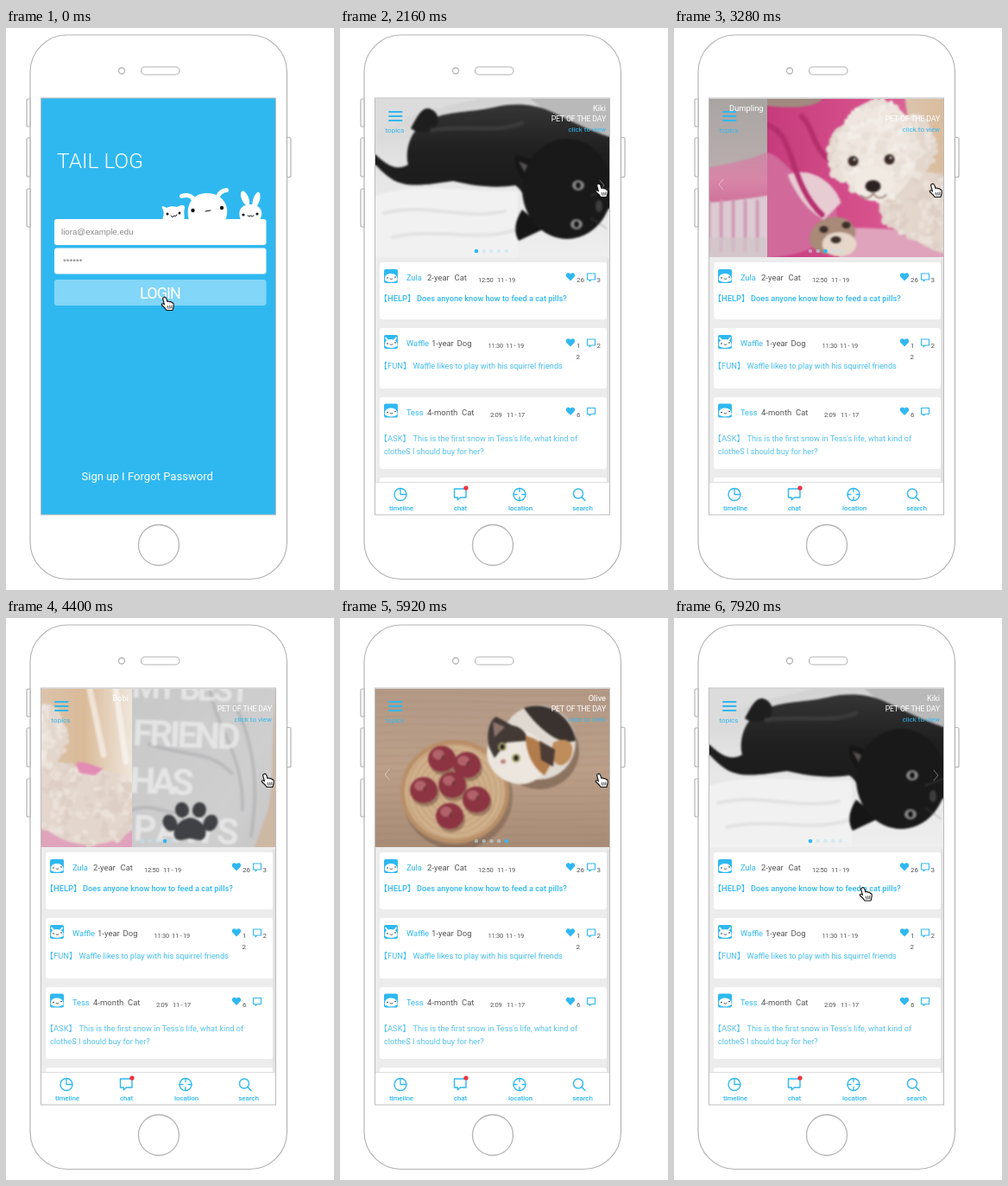
Animation, 380 px wide and 650 px high, one loop 8000 ms. Source, as an HTML page with a canvas:

```html
<!DOCTYPE html>
<html lang="en">
<head>
<meta charset="utf-8">
<title>Pet app</title>
<style>
html, body { margin: 0; width: 100%; height: 100%; overflow: hidden; background: #fff; }
canvas { display: block; width: 380px; height: 650px; }
</style>
</head>
<body>
<canvas id="stage"></canvas>
<script>
const W = 380, H = 650, LOOP = 8000;
const BLUE = '#2fb8f0', GREY = '#555', LINE = '#b4b4b4';
const SX = 41, SY = 81, SW = 271, SH = 482, PH = 183;
const dpr = window.devicePixelRatio || 1;
function sized(canvas, w, h) {
  canvas.width = w * dpr;
  canvas.height = h * dpr;
  const c = canvas.getContext('2d');
  c.scale(dpr, dpr);
  return c;
}
const page = sized(document.getElementById('stage'), W, H);
let ctx = page;

// Drawing helpers
function fill(d, color) { ctx.fillStyle = color; ctx.fill(new Path2D(d)); }
function stroke(d, color, w = 1) {
  ctx.strokeStyle = color;
  ctx.lineWidth = w;
  ctx.lineCap = ctx.lineJoin = 'round';
  ctx.stroke(new Path2D(d));
}
function rect(x, y, w, h, color) { ctx.fillStyle = color; ctx.fillRect(x, y, w, h); }
function rounded(x, y, w, h, r, color, line) {
  ctx.beginPath();
  ctx.roundRect(x, y, w, h, r);
  if (color) { ctx.fillStyle = color; ctx.fill(); }
  if (line) { ctx.strokeStyle = line; ctx.lineWidth = 1.2; ctx.stroke(); }
}
function oval(x, y, rx, ry, color, rot = 0) {
  ctx.beginPath();
  ctx.ellipse(x, y, rx, ry, rot, 0, 7);
  ctx.fillStyle = color;
  ctx.fill();
}
function ring(x, y, r, color, w) {
  ctx.beginPath();
  ctx.arc(x, y, r, 0, 7);
  ctx.strokeStyle = color;
  ctx.lineWidth = w;
  ctx.stroke();
}
function text(s, x, y, size, color, { weight = 400, align = 'left', space = 0, font = 'Roboto' } = {}) {
  ctx.font = `${weight} ${size}px ${font}, sans-serif`;
  ctx.letterSpacing = space + 'px';
  ctx.textAlign = align;
  ctx.fillStyle = color;
  ctx.fillText(s, x, y);
}
function gradient(x0, y0, x1, y1, ...colors) {
  const g = ctx.createLinearGradient(x0, y0, x1, y1);
  colors.forEach((c, i) => g.addColorStop(i / (colors.length - 1), c));
  return g;
}
function at(x, y, draw) {
  ctx.save();
  ctx.translate(x, y);
  draw();
  ctx.restore();
}
function random(seed) {
  return () => (seed = (seed * 16807) % 2147483647) / 2147483647;
}
function fur(x, y, rx, ry, seed, colors, n = 150) {
  const rnd = random(seed);
  oval(x, y, rx, ry, colors[0]);
  for (let i = 0; i < n; i++) {
    const a = rnd() * 6.28, d = Math.sqrt(rnd());
    oval(x + Math.cos(a) * rx * d, y + Math.sin(a) * ry * d, 2 + rnd() * 4, 2 + rnd() * 3, colors[i % colors.length]);
  }
}
const lerp = (a, b, p) => a + (b - a) * p;
const clamp = p => Math.max(0, Math.min(1, p));
const swing = p => 0.5 - Math.cos(Math.PI * clamp(p)) / 2;

// Carousel photos, in a 271 x 183 box
function blackCat() {
  rect(0, 0, SW, PH, gradient(0, 0, 0, PH, '#d2d2d2', '#e6e6e6', '#eeeeee'));
  fill('M0 0H120C80 10 40 14 0 44Z', '#dcdcdc');
  fill('M180 0H271V52C245 45 205 22 180 0Z', '#b9b9b9');
  fill('M0 112C50 96 90 108 165 106V183H0Z', '#f1f1f1');
  stroke('M10 132C60 120 100 140 150 130M20 160C70 148 120 166 160 152', '#e2e2e2', 4);
  // Tail, body and raised paw
  fill('M0 64C12 76 24 84 38 76C34 60 40 38 56 28C76 14 108 16 136 10C160 4 184 6 202 14C224 24 246 36 271 44V126C250 160 214 160 188 134C172 118 172 106 162 100C136 104 112 100 90 95C62 99 34 104 18 92C9 86 4 80 0 76Z',
    gradient(0, 10, 0, 110, '#343434', '#202020', '#1b1b1b'));
  fill('M41 34C47 24 52 10 62 11C72 14 76 24 70 33C62 40 48 40 41 34Z', '#1e1e1e');
  stroke('M66 36C100 30 140 40 170 28', '#3a3a3a', 5);
  fill('M164 82C160 68 160 64 168 66L198 76 178 104Z', '#161616');
  fill('M170 128C161 142 160 154 166 164L196 150Z', '#161616');
  fill('M166 72L184 80 176 91Z', '#565050');
  oval(222, 104, 52, 58, '#191919');
  for (const [x, y] of [[235, 100], [233, 145]]) {
    oval(x, y, 7, 6, '#858585');
    oval(x, y, 2.6, 3.6, '#111');
  }
  oval(259, 124, 4, 7, '#3d3d3d');
  stroke('M250 112L271 104M250 138L268 150', '#666', .6);
}
function basketPup() {
  rect(0, 0, SW, PH, gradient(0, 0, 0, PH, '#a9a5a3', '#b5abaa', '#c4b4b8', '#cfbfc6'));
  fur(120, 60, 52, 46, 31, ['#f1eeea', '#e9e5e0', '#faf8f5']);
  for (const x of [103, 137]) oval(x, 56, 4, 4, '#333');
  oval(120, 70, 6, 4, '#333');
  fill('M0 66C80 92 200 90 271 62V112C190 126 70 126 0 112Z', gradient(0, 60, 0, 124, '#c98ba6', '#d787a8', '#cf6f99'));
  fill('M0 112C70 126 190 126 271 112V183H0Z', '#dccbd2');
  for (let x = 8; x < SW; x += 14) stroke(`M${x} 118V176`, '#d196af', 3.5);
  rect(0, 160, SW, 23, 'rgba(210,198,203,.7)');
}
function pinkPup() {
  rect(0, 0, SW, PH, gradient(0, 0, SW, 0, '#c63b7c', '#d9558f', '#dca4a8'));
  fill('M0 0H64C60 8 36 12 0 8Z', '#a28a80');
  fill('M160 0H271V110H176Z', gradient(160, 0, 271, 0, '#dcc4ae', '#dabb99', '#efe6dc'));
  stroke('M222 0L238 76M252 0L264 84', 'rgba(255,255,255,.55)', 7);
  // Cushion and blanket folds
  fill('M0 62C24 66 40 110 78 122C92 150 60 183 0 183Z', '#d16a9b');
  fill('M24 88C46 78 76 92 86 120L66 140C48 130 34 112 24 88Z', '#e8ccd4');
  stroke('M0 30C34 40 24 96 64 134M40 20C56 34 52 60 78 74', '#b62f6d', 6);
  fill('M84 150C130 146 190 158 271 156V183H84Z', '#dfa3bb');
  const coat = ['#e3d6cc', '#ebe1d9', '#ddcfc5'];
  fur(180, 122, 50, 38, 17, coat);
  fur(222, 136, 62, 44, 23, coat, 200);
  fur(86, 64, 15, 32, 53, ['#e0d4ca', '#e9dfd7'], 40);
  fur(172, 54, 22, 36, 83, ['#e3d7cd', '#ece3dc'], 60);
  fur(128, 60, 46, 58, 7, ['#eee6df', '#f3ede7', '#e8dfd7'], 200);
  oval(124, 98, 23, 20, '#f1eae3');
  for (const [x, y] of [[100, 72], [142, 70]]) {
    oval(x, y, 6, 6, '#3a2b27');
    oval(x + 1.5, y - 2, 1.5, 1.5, '#ddd');
  }
  oval(123, 101, 9, 7, '#2c2222');
  stroke('M123 108C121 116 113 116 109 112M123 108C126 116 134 116 138 111', '#9a8078', 1.8);
  fill('M206 86C216 82 222 88 238 92L228 100 210 97Z', '#e28bb5');
  // Toy
  oval(76, 158, 27, 21, '#a98a78', -.3);
  oval(84, 168, 20, 14, '#e6d7ca');
  oval(66, 151, 5, 4, '#3b2d29');
  oval(92, 146, 5, 4, '#3b2d29');
  oval(80, 163, 6, 4, '#3b2d29');
}
function pawShirt() {
  rect(0, 0, SW, PH, gradient(0, 0, SW, PH, '#c8c8c9', '#cfcfd0', '#bdbcbd'));
  fill('M271 0H168C160 50 166 96 158 140L142 183H271Z', '#cdb8a4');
  stroke('M90 0C98 46 130 76 128 140M120 20C140 60 148 110 138 170M20 64C60 78 90 70 116 98M0 140C30 130 40 150 58 140', 'rgba(130,130,135,.25)', 4);
  ctx.save();
  ctx.rotate(.04);
  const ink = 'rgba(238,238,238,.72)', bold = { weight: 700, space: -3.5 };
  text('MY BEST', 0, 10, 38, ink, bold);
  text('FRIEND', 3, 65, 42, ink, bold);
  text('HAS', 2, 120, 42, ink, { ...bold, space: -5 });
  text('PAWS', 8, 175, 42, ink, { ...bold, space: 3 });
  ctx.restore();
  const pad = '#404144';
  fill('M49 170C47 160 57 150 67 149C79 150 88 160 85 170C82 178 75 174 67 173C59 174 51 178 49 170Z', pad);
  oval(44, 155, 8, 10, pad, -.5);
  oval(58, 140, 8, 9, pad, -.2);
  oval(78, 140, 8, 9, pad, .2);
  oval(91, 155, 8, 10, pad, .5);
}
function appleCat() {
  rect(0, 0, SW, PH, gradient(0, 0, 0, PH, '#b39a87', '#bb9f89', '#a98c76'));
  for (let y = 6; y < PH; y += 9) stroke(`M0 ${y}C80 ${y - 4} 180 ${y + 5} 271 ${y}`, 'rgba(135,105,82,.16)', 1.5);
  oval(95, 124, 64, 62, 'rgba(90,65,48,.35)');
  oval(92, 119, 63, 60, '#b88f68');
  oval(92, 119, 58, 55, '#d0b18c');
  for (let r = 12; r < 58; r += 6) ring(92, 119, r, 'rgba(155,118,82,.3)', 1.5);
  for (const [x, y] of [[77, 81], [106, 88], [56, 117], [89, 111], [117, 128], [86, 147]]) {
    oval(x + 2, y + 4, 16, 15, 'rgba(80,45,35,.4)');
    oval(x, y, 16, 15, '#8c3442');
    oval(x - 4, y - 5, 7, 6, '#b2626a');
    stroke(`M${x} ${y}l2 -4`, '#4a2822', 1.5);
  }
  // Body, then head with ears
  oval(190, 72, 46, 44, 'rgba(75,55,42,.4)');
  oval(189, 62, 43, 43, '#e0d9d2');
  fill('M172 22C200 12 228 32 232 60C214 66 190 48 172 22Z', '#3a322e');
  fill('M206 62C222 54 233 62 226 80C216 96 200 88 206 62Z', '#bf8c5b');
  oval(164, 78, 36, 31, '#ece6df', .5);
  fill('M132 68C128 52 132 36 140 32L158 42C170 44 176 52 176 60L152 62 138 80Z', '#433a36');
  fill('M174 54C188 58 200 66 206 82L196 100C184 92 174 76 174 54Z', '#b27b4b');
  fill('M190 60L208 70 206 90 192 82Z', '#4b3c35');
  fill('M136 38L150 44 138 56Z', '#8d736b');
  for (const [x, y] of [[147, 67], [163, 80]]) {
    oval(x, y, 5, 5, '#a8a169');
    oval(x, y, 2.5, 3, '#222');
  }
  oval(148, 84, 3, 2.5, '#b97f79');
}

// Renders a photo once with a soft focus
function photo(draw) {
  const sharp = document.createElement('canvas'), soft = document.createElement('canvas');
  ctx = sized(sharp, SW, PH);
  draw();
  ctx = sized(soft, SW, PH);
  ctx.drawImage(sharp, 0, 0, SW, PH);
  ctx.filter = `blur(${1.2 * dpr}px)`;
  ctx.drawImage(sharp, 0, 0, SW, PH);
  ctx = page;
  return soft;
}
const slides = [
  [photo(blackCat), 'Kiki'], [photo(basketPup), 'Dumpling'], [photo(pinkPup), 'Bobi'],
  [photo(pawShirt), 'Milo'], [photo(appleCat), 'Olive']
];
const clicks = [2230, 3013, 4172, 5250, 6060], SLIDE = 400;

function slide(i, x) {
  const [image, name] = slides[i % 5];
  at(SX + x, 82, () => {
    ctx.drawImage(image, 0, 0, SW, PH);
    text(name, 267, 14, 9.3, '#fff', { align: 'right' });
  });
}
function carousel(t) {
  const n = clicks.filter(c => t >= c).length;
  const p = n ? swing((t - clicks[n - 1]) / SLIDE) : 1;
  if (p < 1) slide(n - 1, -p * SW);
  slide(n, (1 - p) * SW);
  const active = n % 5;
  for (let i = 0; i < 5; i++) oval(158 + i * 8.7, 258, 2.3, 2.3, i === active ? BLUE : 'rgba(190,225,240,.55)');
  if (active > 0) stroke('M57 175L52 181 57 187', 'rgba(255,255,255,.45)');
  if (active < 4) stroke('M301 176L306 182 301 188', 'rgba(255,255,255,.4)');
  text('PET OF THE DAY', 308, 108, 8.8, '#fff', { align: 'right', space: -.2 });
  text('click to view', 308, 120, 8, BLUE, { align: 'right' });
  for (const y of [97, 102, 107]) stroke(`M57 ${y}H71.5`, BLUE, 2);
  text('topics', 63.5, 121, 8, BLUE, { align: 'center' });
}

// Feed
function avatar(y, ears) {
  rounded(51, y - 8, 16, 16, 2, BLUE);
  fill(`M52 ${y + 5}C51 ${y - 1} 55 ${y - 3} 59 ${y - 3}C64 ${y - 3} 67 ${y} 66.5 ${y + 5}Q59 ${y + 9} 52 ${y + 5}Z`, '#fff');
  if (ears) stroke(`M55 ${y - 2}l-2 -2.5M63 ${y - 2}l2 -2.5`, '#fff', 2);
  oval(55, y + 2, .8, .8, '#222');
  oval(64, y + 1, .8, .8, '#222');
  stroke(`M58 ${y + 3}q1.5 1.2 3 0`, '#222', .7);
}
function bubble(x, y, w, h, line) {
  stroke(`M${x} ${y}h${w}v${h}h${-w * .5}l${-w * .22} ${w * .2}v${-w * .2}h${-w * .28}z`, BLUE, line);
}
function post({ y, name, age, ageX, kind, kindX, time, timeX, date, dateX, likes, notes, ears }) {
  avatar(y - 2, ears);
  text(name, 77, y + 3, 9.3, BLUE);
  text(age, ageX, y + 3, 9.5, GREY);
  text(kind, kindX, y + 3, 9.5, GREY);
  text(time, timeX, y + 5, 7.5, GREY, { space: -.25 });
  text(date, dateX, y + 5, 7.5, GREY, { space: -.25 });
  fill(`M267 ${y + 3.5}l-4.6 -4.7c-2 -2.4 1.5 -6.5 4.6 -3.2c3.1 -3.3 6.6 .8 4.6 3.2z`, BLUE);
  bubble(286.5, y - 5, 9, 7, 1.1);
  likes.forEach((s, i) => text(s, 274 - i * .5, y + 5 + i * 13, 8, GREY));
  text(notes, 297.5, y + 5, 8, GREY);
}
function topic(tag, y, color, weight, ...lines) {
  const cjk = { font: '"Noto Sans CJK SC", "Noto Sans CJK JP"', weight };
  text('【', 55, y, 9.5, color, { ...cjk, align: 'right' });
  text(tag, 55, y, 9.4, color, { weight });
  text('】', 55 + ctx.measureText(tag).width, y, 9.5, color, cjk);
  lines.forEach((s, i) => text(s, i ? 51 : tag === 'HELP' ? 89 : 84.5, y + i * 15.5, 9.2, color, { weight }));
}
const posts = [
  { y: 289, name: 'Zula', age: '2-year', ageX: 101, kind: 'Cat', kindX: 132.5, time: '12:50', timeX: 160, date: '11 - 19', dateX: 182, likes: ['26'], notes: '3' },
  { y: 365, name: 'Waffle', age: '1-year', ageX: 106, kind: 'Dog', kindX: 135.5, time: '11:30', timeX: 171.5, date: '11 - 19', dateX: 192, likes: ['1', '2'], notes: '2', ears: true },
  { y: 444.5, name: 'Tess', age: '4-month', ageX: 101, kind: 'Cat', kindX: 141, time: '2:09', timeX: 174, date: '11 - 17', dateX: 193, likes: ['6'], notes: '' }
];
function tabs() {
  rect(SX, 525, SW, 38, '#fff');
  stroke('M41 525.5H312', '#ddd');
  ring(70, 539.5, 7, BLUE, 1.4);
  stroke('M70 533V539.5H76.5', BLUE, 1.3);
  bubble(132.5, 533, 13.5, 10, 1.4);
  oval(146, 532, 2.6, 2.6, '#f0303c');
  ring(208, 539.5, 7, BLUE, 1.4);
  stroke('M208 532.5v4M208 542.5v4M201 539.5h4M211 539.5h4', BLUE, 1.3);
  ring(276, 538.5, 5.5, BLUE, 1.4);
  stroke('M280 542.5L284 546.5', BLUE, 1.5);
  [['timeline', 71], ['chat', 139.5], ['location', 209], ['search', 281]]
    .forEach(([s, x]) => text(s, x, 558, 8, BLUE, { weight: 500, align: 'center', space: -.1 }));
}
function feed(t) {
  rect(SX, SY, SW, SH, '#ececec');
  carousel(t);
  rounded(309.5, 267, 2, 258, 1, '#dedede');
  for (const [y, h] of [[271, 66], [347, 70], [427, 83], [520, 20]]) rounded(46, y, 263, h, 3, '#fff');
  posts.forEach(post);
  topic('HELP', 316, BLUE, 500, 'Does anyone know how to feed a cat pills?');
  topic('FUN', 394, '#42bdec', 400, 'Waffle likes to play with his squirrel friends');
  topic('ASK', 477.5, '#55c2ec', 400, "This is the first snow in Tess's life, what kind of", 'clotheS I should buy for her?');
  tabs();
}

// Login
function mascots() {
  const ink = '#111';
  fill('M181 222C183 217 183 214 182 210C179 206 181 205 186 208C190 206 194 206 198 207C203 204 208 204 207 209C205 214 208 218 206 222Z', '#fff');
  fill('M212 222C207 204 217 191 233 191C251 191 261 207 254 222Z', '#fff');
  stroke('M217 198C214 193 208 193 203.5 194.5M246 194C248 189 252 188 255.5 187.5', '#fff', 5);
  fill('M272 222C267 210 274 204 283 204C293 204 300 211 294 222Z', '#fff');
  oval(277, 197, 4, 9, '#fff', -.4);
  oval(290, 199, 3.8, 9.5, '#fff', .3);
  for (const [x, y, r] of [[187, 215, 1.5], [201, 214, 1.5], [216.5, 211, 2.2], [250, 208, 2.2], [275, 216, 1.6], [291, 215, 1.6]]) oval(x, y, r, r, ink);
  stroke('M191 217q2 3 4 0q2 2 3 -1M231 212l6 -1M280 217q2 2 3.5 0q2 2 3.5 0', ink, 1);
}
function login() {
  rect(SX, SY, SW, SH, BLUE);
  text('TAIL LOG', 59, 162, 24.5, '#fff', { weight: 300 });
  mascots();
  rounded(56, 221, 245.5, 30, 3, '#fff');
  rounded(56, 254.5, 245.5, 30, 3, '#fff');
  rounded(56, 291, 245.5, 30, 3, '#82d6f7');
  const arial = { font: '"Liberation Sans", Arial' };
  text('liora@example.edu', 64, 238.5, 9.7, '#888', arial);
  text('******', 66, 273, 9.7, '#777', arial);
  text('LOGIN', 178.5, 313, 18, '#fff', { align: 'center', space: -.9 });
  text('Sign up I Forgot Password', 87.5, 522.5, 13.1, '#fff');
}

function phone() {
  rounded(28, 8, 297.5, 629.5, 43, '#fff', LINE);
  for (const [y, h] of [[82, 32], [127, 45], [186, 44]]) rounded(24, y, 4, h, [2, 0, 0, 2], '#fff', LINE);
  rounded(325.5, 126.5, 4.5, 46, [0, 2, 2, 0], '#fff', LINE);
  ring(134, 49.5, 3.5, LINE, 1.3);
  rounded(156.5, 45, 44.5, 9, 4.5, null, LINE);
  ring(177, 598, 23.5, LINE, 1.3);
}
function cursor(t) {
  const a = swing((t - 1000) / 800), b = swing((t - 6800) / 700);
  const x = lerp(lerp(187, 303, a), 222, b), y = lerp(lerp(319, 188, a), 319.5, b);
  at(x, y, () => {
    const hand = 'M-4 -7.5C-2.5 -8.5 -1.5 -7 -1 -5.5L0 -2.5C1 -3.5 2.5 -3 2.7 -2C4 -3 5.2 -2 5.3 -1C6.8 -1.5 7.3 0 7.2 1.5C7.2 4 6.5 5 6 7.5H-1C-2.5 4.5 -5 3 -6.5 1.5C-7.3 0 -5.5 -1 -3.5 .8L-5.3 -5.5C-5.6 -6.8 -5 -7.3 -4 -7.5Z';
    fill(hand, '#fff');
    stroke(hand, '#111', 1.1);
    stroke('M.3 2.5L1 5.5M2.6 2.3L3 5.3M4.8 2L4.8 5', '#111', .8);
  });
}

function draw(now) {
  const t = now % LOOP;
  rect(0, 0, W, H, '#fff');
  phone();
  ctx.save();
  ctx.beginPath();
  ctx.rect(SX, SY, SW, SH);
  ctx.clip();
  if (t < 720) login(); else feed(t);
  ctx.restore();
  ctx.strokeStyle = '#bbb';
  ctx.lineWidth = 1;
  ctx.strokeRect(40.5, 81, 272, 482);
  cursor(t);
}
const start = performance.now();
function tick() {
  draw(performance.now() - start);
  requestAnimationFrame(tick);
}
tick();
</script>
</body>
</html>
```
